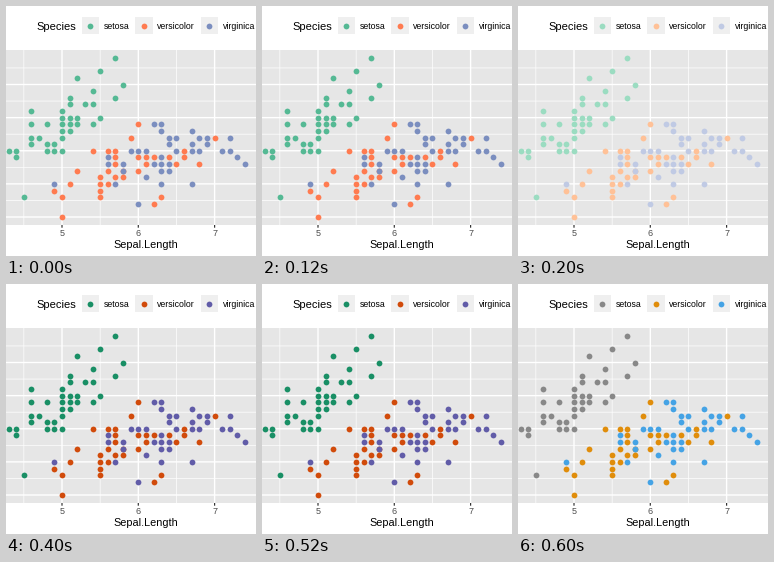
A matplotlib script for the animation above (0.8 s loop, 250x250 px).

```python
import matplotlib.pyplot as plt
from matplotlib.animation import FuncAnimation
from matplotlib.patches import Rectangle

SIZE, DPI = 250, 100
PT = 72 / DPI  # points per pixel
DOT = (5.8 * PT) ** 2

# Iris measurements in tenths of a cm: sepal width -> sepal lengths
SETOSA = {
    23: [45], 29: [44], 30: [43, 44, 48, 49, 50], 31: [46, 48, 49],
    32: [46, 47, 50], 33: [50, 51], 34: [46, 48, 50, 51, 52, 54],
    35: [50, 51, 52, 55], 36: [46, 50], 37: [51, 53, 54], 38: [51, 57],
    39: [54], 40: [58], 41: [52], 42: [55], 44: [57],
}
VERSICOLOR = {
    20: [50], 22: [62], 23: [50, 55, 63], 24: [49, 55], 25: [51, 55, 56],
    26: [55, 57, 58], 27: [52, 56, 58, 60], 28: [57, 61, 65, 68],
    29: [57, 60, 61, 62, 64, 66], 30: [54, 56, 57, 66],
    32: [59, 70], 34: [60],
}
VIRGINICA = {
    22: [60], 25: [49, 57, 63, 67], 26: [61], 27: [58, 63, 64],
    28: [56, 58, 62, 63, 64, 74], 29: [56, 63, 73],
    30: [59, 60, 61, 65, 67, 68, 71, 72], 31: [64, 67, 69],
    32: [64, 65, 68, 69, 72], 33: [63, 67], 34: [62, 63],
}
SPECIES = [("setosa", SETOSA, 84.3), ("versicolor", VERSICOLOR, 138),
           ("virginica", VIRGINICA, 203.3)]
PALETTES = [
    ("#55b994", "#ff7b50", "#7b8ebf"),
    ("#9bdcc1", "#ffc197", "#c0cae4"),
    ("#198f65", "#d14b0b", "#615ca8"),
    ("#888888", "#e08d0b", "#45a3e5"),
]


def px(length):
    return 56 + (length - 5) * 76.3


def py(width):
    return 211 - (width - 2) * 66.25


fig = plt.figure(figsize=(SIZE / DPI, SIZE / DPI), dpi=DPI, facecolor="white")
ax = fig.add_axes([0, 0, 1, 1])
ax.set(xlim=(0, SIZE), ylim=(SIZE, 0))
ax.axis("off")


def box(x, y, w, h, color):
    ax.add_patch(Rectangle((x, y), w, h, color=color, lw=0))


def line(xs, ys, width, color="white"):
    ax.plot(xs, ys, color=color, lw=width * PT, snap=False,
            solid_capstyle="butt")


def label(x, y, text, size, color="black", ha="left"):
    ax.text(x, y, text, fontsize=size * PT, color=color, ha=ha,
            va="baseline", family="Liberation Sans")


TOP, BOTTOM = 44, 219
box(0, TOP, SIZE, BOTTOM - TOP, "#e6e6e6")

for i in range(6):
    x = px(4.5 + i / 2)
    line([x, x], [TOP, BOTTOM], 1.4 if i % 2 else 0.7)
for i in range(10):
    y = py(2 + i / 4)
    line([0, SIZE], [y, y], 0.7 if i % 2 else 1.4)
for n in (5, 6, 7):
    line([px(n)] * 2, [BOTTOM, BOTTOM + 2.7], 1.2, "#333333")
    label(px(n), 230.5, str(n), 9, "#4d4d4d", "center")
label(140, 242.5, "Sepal.Length", 10.9, ha="center")

label(30.5, 23.5, "Species", 11.1)
dots = []
for name, rows, key_x in SPECIES:
    box(key_x - 8.6, 10.9, 17.2, 17.2, "#efefef")
    label(key_x + 13.3, 22.7, name, 8.8)
    points = [(px(l / 10), py(w / 10)) for w, ls in rows.items() for l in ls]
    points.append((key_x, 19.5))
    dots.append(ax.scatter(*zip(*points), s=DOT, linewidths=0, zorder=3))


def update(frame):
    for group, color in zip(dots, PALETTES[frame % len(PALETTES)]):
        group.set_facecolor(color)
    return dots


anim = FuncAnimation(fig, update, frames=len(PALETTES), interval=200,
                     repeat=True, repeat_delay=0)
plt.show()
```
